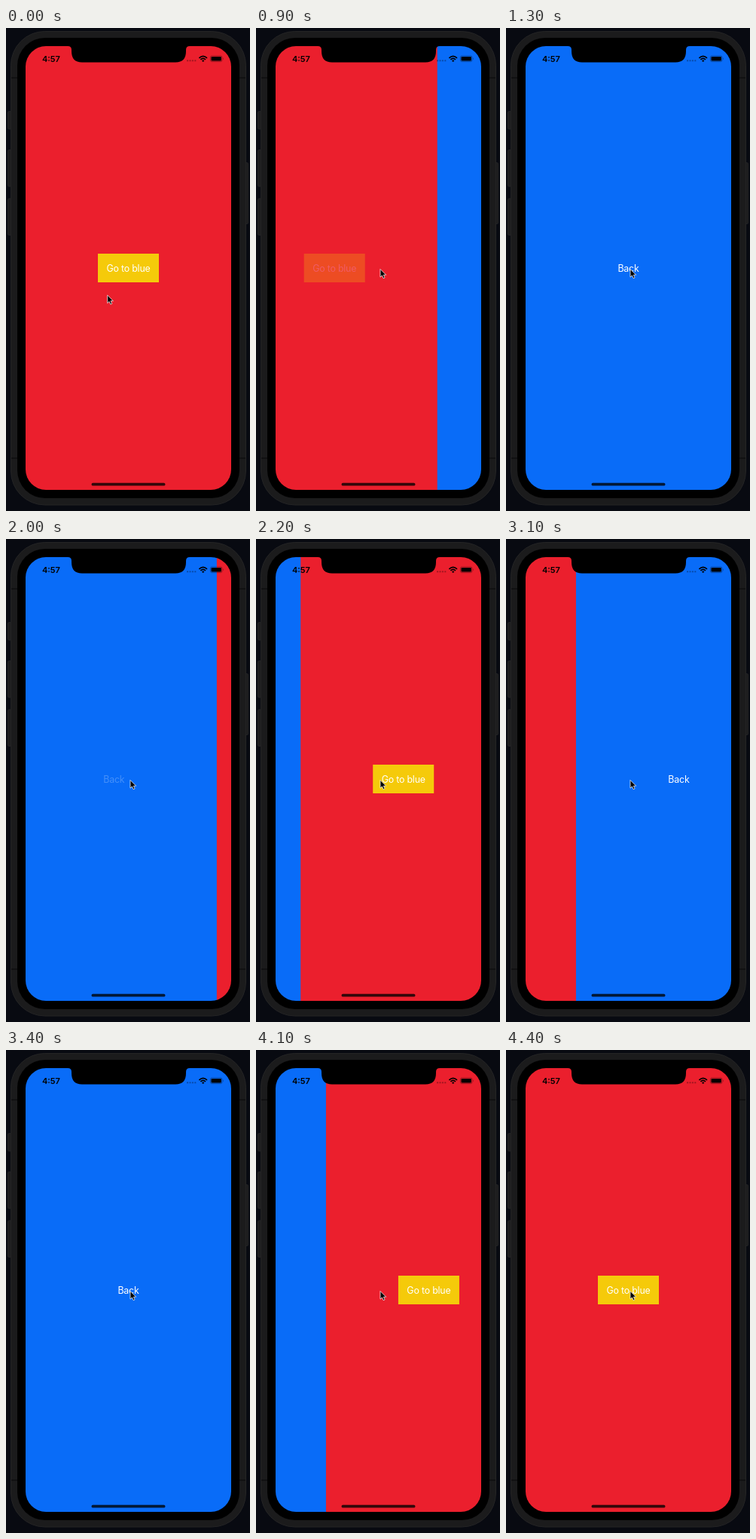
An HTML page for the animation above (4700 ms loop, 324 px wide and 640 px high).

```html
<!DOCTYPE html>
<html lang="en">
<head>
<meta charset="utf-8">
<title>Push transition</title>
<style>
  html, body { margin: 0; width: 100%; height: 100%; overflow: hidden; background: #080a11; }
  svg { display: block; width: 100vw; height: 100vh; }
  text { font-family: Inter, "Liberation Sans", sans-serif; }
  .label { font-size: 12.4px; letter-spacing: -.2px; fill: #fff; text-anchor: middle; }
</style>
</head>
<body>
<svg viewBox="0 0 324 640">
  <defs>
    <clipPath id="screen"><rect x="26" y="24" width="273" height="588" rx="27"/></clipPath>
  </defs>

  <!-- phone body -->
  <g fill="#1c1c1d" stroke="#29292a" stroke-width=".7">
    <rect x="2.5" y="110.5" width="5" height="23.5" rx="1.5"/>
    <rect x="2.5" y="161.5" width="5" height="48.5" rx="1.5"/>
    <rect x="2.5" y="226" width="5" height="48.5" rx="1.5"/>
    <rect x="317" y="178.5" width="4.5" height="81" rx="1.5"/>
  </g>
  <rect x="6.5" y="4.5" width="312" height="627.5" rx="45" fill="#1b1b1c" stroke="#242425"/>
  <path d="M7 66h8M310 66h8M7 570h8M310 570h8" stroke="#111112" stroke-width="2"/>
  <rect x="15" y="13" width="295" height="610" rx="37" fill="#000"/>

  <g clip-path="url(#screen)">
    <g id="leaving"></g>
    <g id="entering"></g>
    <path d="M82 23H244V24Q239 24 239 29V31Q239 45.500 225 45.500H101Q87 45.500 87 31V29Q87 24 82 24Z"/>
    <rect x="113.500" y="602.800" width="98" height="3.800" rx="1.900" fill-opacity=".78"/>
  </g>

  <!-- status bar -->
  <text x="60" y="44.600" font-size="11" font-weight="600" text-anchor="middle">4:57</text>
  <g fill-opacity=".3">
    <rect x="240" y="42.300" width="2.200" height="2" rx=".6"/>
    <rect x="243.400" y="42.300" width="2.200" height="2" rx=".6"/>
    <rect x="246.800" y="42.300" width="2.200" height="2" rx=".6"/>
    <rect x="250.200" y="42.300" width="2.200" height="2" rx=".6"/>
  </g>
  <g fill="none" stroke="#000" stroke-width="1.700">
    <path d="M256.400 39.800Q261.700 34.900 267 39.800"/>
    <path d="M258.400 41.900Q261.700 38.900 265 41.900"/>
  </g>
  <path d="M260 43.300Q261.700 41.900 263.400 43.300L261.700 45Z"/>
  <rect x="271.400" y="36.900" width="15.600" height="7.700" rx="2.200" fill="none" stroke="#000" stroke-opacity=".4" stroke-width=".8"/>
  <rect x="272.500" y="38" width="13.400" height="5.500" rx="1.300"/>
  <path d="M288 39.300q1.300 1.400 0 2.900z" fill-opacity=".45"/>

  <path id="cursor" d="M0 0V10.600L2.400 8.400L4.100 12.200L6 11.400L4.400 7.700H7.700Z" stroke="#fff" stroke-opacity=".9" stroke-width=".8" stroke-linejoin="round"/>
</svg>
<script>
const LOOP = 4700, STEP = 100, SLIDE = 350, WIDTH = 273, DIMMED = .22;
const pushes = [
  { press: 700, start: 788 },
  { press: 1800, start: 1935 },
  { press: 2800, start: 2870 },
  { press: 3800, start: 3870 }
];
const pages = [
  { color: '#eb1f2d', button: '<rect x="122" y="299" width="81" height="38" fill="#f5ca0a"/><text class="label" x="162.500" y="322.800">Go to blue</text>' },
  { color: '#096cf8', button: '<text class="label" x="162.500" y="322.800">Back</text>' }
];
const leaving = document.getElementById('leaving');
const entering = document.getElementById('entering');
const cursor = document.getElementById('cursor');

const clamp = v => Math.min(1, Math.max(0, v));
const mix = (a, b, p) => a + (b - a) * p;

// cubic-bezier(.42, 0, .58, 1), solved by bisection
function easeInOut(x) {
  if (x <= 0 || x >= 1) return clamp(x);
  let low = 0, high = 1, u = .5;
  for (let i = 0; i < 24; i++) {
    u = (low + high) / 2;
    const at = 1.26 * u * (1 - u) ** 2 + 1.74 * u * u * (1 - u) + u ** 3;
    if (at < x) low = u; else high = u;
  }
  return u * u * (3 - 2 * u);
}

function showPage(group, index, x, opacity) {
  const { color, button } = pages[index % 2];
  group.innerHTML = `<rect x="26" y="24" width="${WIDTH + 1}" height="588" fill="${color}"/><g opacity="${opacity}">${button}</g>`;
  group.setAttribute('transform', `translate(${x} 0)`);
}

function render(t) {
  const done = pushes.filter(p => t >= p.start + SLIDE).length;
  const push = pushes[done];
  const p = push ? easeInOut((t - push.start) / SLIDE) : 0;
  const pressed = push && t >= push.press;
  showPage(leaving, done, -WIDTH * p, pressed ? DIMMED + .2 * p : 1);
  showPage(entering, done + 1, WIDTH * (1 - p), 1);

  const move = easeInOut(t / 600);
  cursor.setAttribute('transform', `translate(${mix(134.7, 165, move)} ${mix(354, 319.5, move)})`);
}

const origin = performance.now();
let shown = -1;
function tick() {
  const t = Math.floor((performance.now() - origin) % LOOP / STEP) * STEP;
  if (t !== shown) render(shown = t);
  requestAnimationFrame(tick);
}
tick();
</script>
</body>
</html>
```
